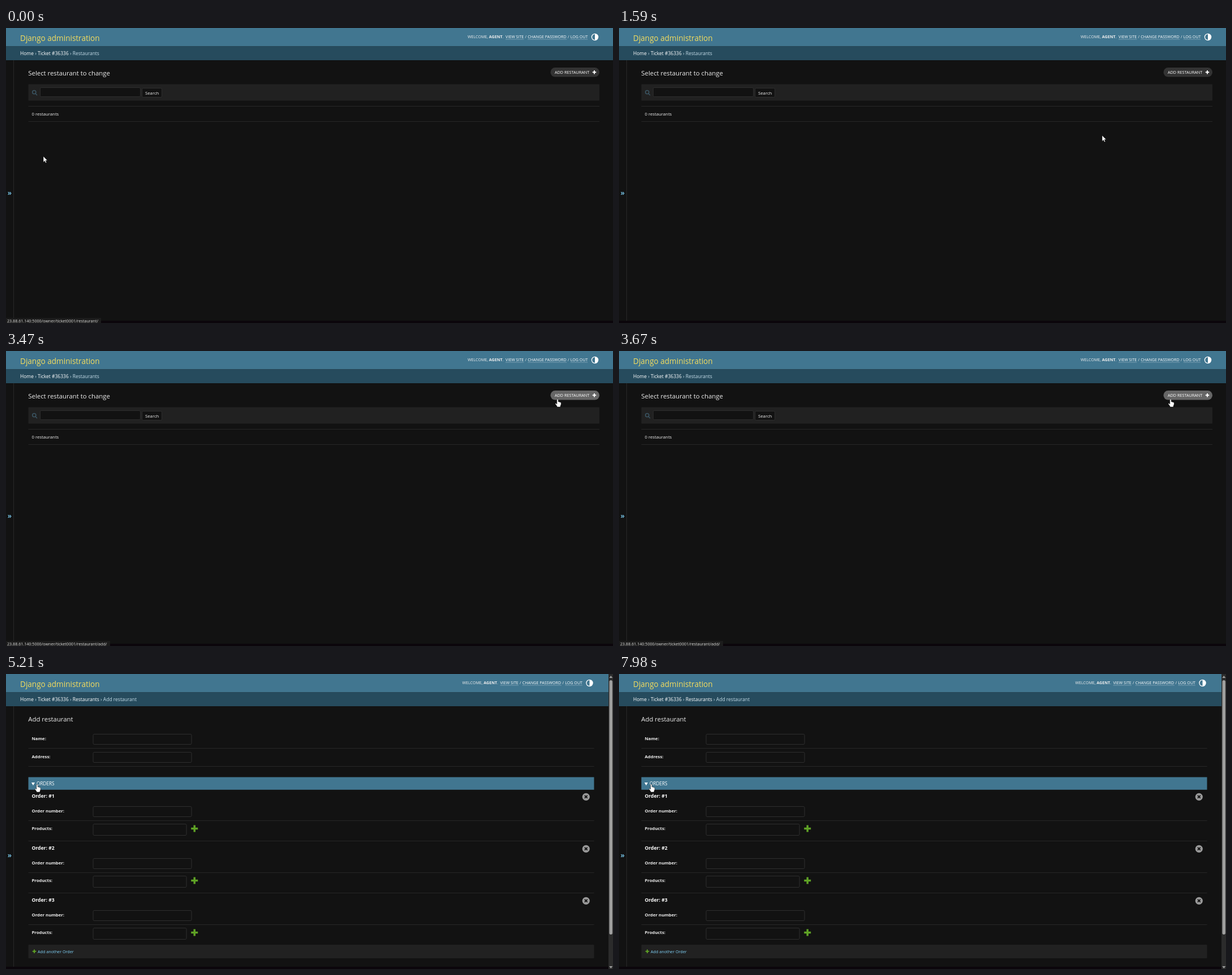
An HTML page that plays this animation: 1073x522 px, repeating every 8000 ms.

```html
<!DOCTYPE html>
<html lang="en">
<head>
<meta charset="utf-8">
<title>Add restaurant</title>
<style>
  html, body { margin: 0; width: 100%; height: 100%; overflow: hidden; background: #121212; }
  svg { display: block; width: 1073px; height: 522px; font-family: "Open Sans", "Noto Sans", sans-serif; }
  text { white-space: pre; }
</style>
</head>
<body>
<svg id="stage" viewBox="0 0 1073 522"></svg>
<script>
const LOOP = 8000, NAVIGATE = 3680, BLUR = 5000, EXPAND = 5200;
const TEAL = '#417690', NAVY = '#264b5d', PANEL = '#212121', LINE = '#272727',
      BORDER = '#2e2e2e', SKY = '#81d4fa', GREEN = '#5fa225', BG = '#121212';
const LEFT = 39.5, LABEL = 45.5, BODY = 7.75, SMALL = 7.1;

const rect = (x, y, w, h, fill, extra = '') =>
  `<rect x="${x}" y="${y}" width="${w}" height="${h}" fill="${fill}" ${extra}/>`;
const text = (x, y, size, str, fill = '#eee', weight = 400) =>
  `<text x="${x}" y="${y}" font-size="${size}" fill="${fill}" font-weight="${weight}">${str}</text>`;
const path = (d, fill, extra = '') => `<path d="${d}" fill="${fill}" ${extra}/>`;
const group = (id, body) => `<g id="${id}">${body}</g>`;
const shifted = (x, y, body) => `<g transform="translate(${x} ${y})">${body}</g>`;
const field = (x, y, w, h) => rect(x + .5, y + .5, w - 1, h - 1, BG, `rx="2" stroke="${BORDER}"`);
const plus = (x, y, r, fill) =>
  path(`M${x - r} ${y}h${2 * r}M${x} ${y - r}v${2 * r}`, 'none', `stroke="${fill}" stroke-width="${r * .58}"`);
const rule = (y, right) => rect(LEFT, y, right - LEFT, 1, LINE);
const panel = (y, h, right) => rect(LEFT, y, right - LEFT, h, PANEL, 'rx="1"');
const fieldRow = (label, y, w = 175, h = 19) =>
  text(LABEL, y + 11.4, BODY, label, '#eee', 700) + field(153.5, y, w, h);
const button = (x, w, label, fill) =>
  rect(x, 232, w, 23, fill, 'rx="2.5"') + text(x + 9, 246.8, 7.98, label, '#fff');
const link = (x, w, label) =>
  text(x, 18, SMALL, label, '#fff') + rect(x, 19.5, w, 1, '#fff', 'opacity=".3"');

function userTools() {
  return text(816, 18, SMALL, 'WELCOME, <tspan font-weight="700">AGENT</tspan>.') +
    link(883, 32.5, 'VIEW SITE') + text(917.5, 18, SMALL, '/') +
    link(922.3, 69, 'CHANGE PASSWORD') + text(993, 18, SMALL, '/') +
    link(997.8, 30.5, 'LOG OUT') +
    '<circle cx="1041" cy="16" r="5.6" fill="none" stroke="#fff" stroke-width="1.3"/>' +
    path('M1041 10.4a5.6 5.6 0 0 1 0 11.2z', '#fff');
}

function frame(title, trail, open) {
  const links = trail.slice(0, -1).map(s => `<tspan fill="#fff">${s}</tspan> › `).join('');
  return rect(0, 0, 1073, 32.5, TEAL) + rect(0, 32.5, 1073, 24.5, NAVY) +
    text(25, 22.5, 13.56, 'Django administration', '#f5dd5d') +
    shifted(open ? -9.5 : 0, 0, userTools()) +
    text(25, 48.3, 8.48, links + trail.at(-1), '#c4dce8') +
    rect(13, 57, 1, 461, LINE) + text(2.8, open ? 324.8 : 296.2, 13, '»', SKY, 600) +
    text(39.3, 83.8, 11.36, title) +
    rect(0, 518, 1073, 4, '#0b060b');
}

function listPage() {
  return frame('Select restaurant to change', ['Home', 'Ticket #36336', 'Restaurants']) +
    rect(962.5, 70, 86.5, 16.6, '#333', 'rx="8.3" id="addButton"') +
    text(970, 80.8, 7.22, 'ADD RESTAURANT', '#fff') + plus(1040, 78.3, 3.2, '#fff') +
    panel(99.5, 29, 1049) +
    '<g fill="none" stroke="#3b5563" stroke-width="1.5"><circle cx="49.8" cy="113.6" r="3.1"/><path d="M52 116l3 3"/></g>' +
    field(60, 105, 178, 17) + field(240, 106, 36, 17) + text(246, 117.6, BODY, 'Search') +
    rule(138, 1049) + text(LABEL, 155, BODY, '0 restaurants') + rule(165, 1049);
}

function order(i, right) {
  return shifted(0, 92 * i,
    text(LABEL, 219.4, 8.6, `Order: #${i + 1}`, '#fff', 700) +
    '<circle cx="1025.3" cy="217.3" r="6.6" fill="#999"/>' +
    path('M1022.9 214.9l4.8 4.8m0-4.8l-4.8 4.8', 'none', `stroke="${BG}" stroke-width="1.8"`) +
    fieldRow('Order number:', 234) + rule(259, right) +
    fieldRow('Products:', 265, 166, 21) + plus(333.2, 273.5, 6, GREEN) +
    (i < 2 ? rule(295, right) : ''));
}

function formPage(open) {
  const right = open ? 1039.5 : 1049;
  const head = frame('Add restaurant', ['Home', 'Ticket #36336', 'Restaurants', 'Add restaurant'], open) +
    fieldRow('Name:', 106) + rule(131, right) +
    fieldRow('Address:', 138) + rule(163, right) +
    rect(LEFT, 182.5, right - LEFT, 22.3, TEAL) + text(54, 197.1, 8.2, 'ORDERS', '#fff') +
    path(open ? 'M45 192h6l-3 5.2z' : 'M45 191.5v6l5-3z', '#fff');
  if (!open) {
    return head +
      rect(154.5, 107, 173, 17, BG, 'rx="2.5" stroke="#fff" stroke-width="1.7" id="focus"') +
      panel(223.5, 39.5, right) +
      button(49, 38, 'SAVE', NAVY) +
      button(93, 99, 'Save and add another', TEAL) +
      button(198, 114, 'Save and continue editing', TEAL);
  }
  return head + [0, 1, 2].map(i => order(i, right)).join('') +
    panel(479, 24, right) + plus(50, 490.7, 3.2, GREEN) +
    text(56, 493.8, 7.23, 'Add another Order', SKY) +
    rect(1065, 0, 8, 522, '#2b2b2b') + rect(1066.5, 11, 5.5, 450, '#9f9f9f', 'rx="2.7"') +
    path('M1066.3 7l3-4 3 4zM1066.3 517l3 4 3-4z', '#9f9f9f');
}

document.getElementById('stage').innerHTML =
  rect(0, 0, 1073, 522, BG) +
  group('list', listPage()) + group('closed', formPage(false)) + group('open', formPage(true)) +
  group('status', rect(0, 513, 168, 9, '#1c1c1c', 'id="statusBox"') +
    text(2, 521.2, 7.15, '<tspan id="url"></tspan>', '#ddd')) +
  group('cursor',
    path('M0 0V10.4L2.4 8.2 4 11.8 5.7 11 4.2 7.6H7.3z', '#fff', 'id="arrow" stroke="#000" stroke-width=".5"') +
    path('M-1.2 1Q0-1 1.2 1V4.6L5.2 5.7 6.2 6.5V9.5L5 12.4V14H-1V12.7L-4 8.8Q-4.4 7.4-3 7.5L-1.2 9z',
      '#fff', 'id="hand" stroke="#000" stroke-width=".5"'));

const el = id => document.getElementById(id);
const show = (id, on) => el(id).style.display = on ? '' : 'none';
const ramp = (t, a, b) => Math.min(1, Math.max(0, (t - a) / (b - a)));

// Pointer key points: time, x, y
const stops = [
  [0, 66, 227], [450, 75, 146], [1080, 190, 284], [1590, 853, 191], [1660, 912, 122],
  [1900, 985, 82], [3180, 985, 82], [3300, 975, 85], [3800, 975, 85], [4280, 158, 199],
  [4600, 30, 206], [5000, 55, 195], [5600, 54, 195], [6360, 199, 302], [6570, 205, 262],
  [7190, 203, 303], [LOOP, 53, 192]
];

function pointer(t) {
  const i = stops.findIndex(s => s[0] > t);
  const [t0, x0, y0] = stops[i - 1], [t1, x1, y1] = stops[i];
  const k = (t - t0) / (t1 - t0);
  return [x0 + (x1 - x0) * k, y0 + (y1 - y0) * k];
}

function draw(t) {
  const [x, y] = pointer(t), onList = t < NAVIGATE, opened = t >= EXPAND;
  show('list', onList);
  show('closed', !onList && !opened);
  show('open', opened);
  show('focus', t < BLUR);

  const hover = onList ? x > 962 && y > 69 && y < 88 : x > LEFT && y > 182 && y < 205;
  show('hand', hover);
  show('arrow', !hover);
  el('cursor').setAttribute('transform', `translate(${Math.round(x)} ${Math.round(y)})`);
  const grey = 51 + 51 * ramp(t, 1800, 1950);
  el('addButton').setAttribute('fill', `rgb(${grey},${grey},${grey})`);

  const adding = t > 1500;
  el('url').textContent = '23.88.61.140:5000/owner/ticket0001/restaurant/' + (adding ? 'add/' : '');
  el('statusBox').setAttribute('width', adding ? 184 : 168);
  el('status').setAttribute('opacity', adding ? onList * ramp(t, 2490, 2600) : 1 - ramp(t, 550, 830));
}

const start = performance.now();
function tick() {
  draw((performance.now() - start) % LOOP);
  requestAnimationFrame(tick);
}
tick();
</script>
</body>
</html>
```
